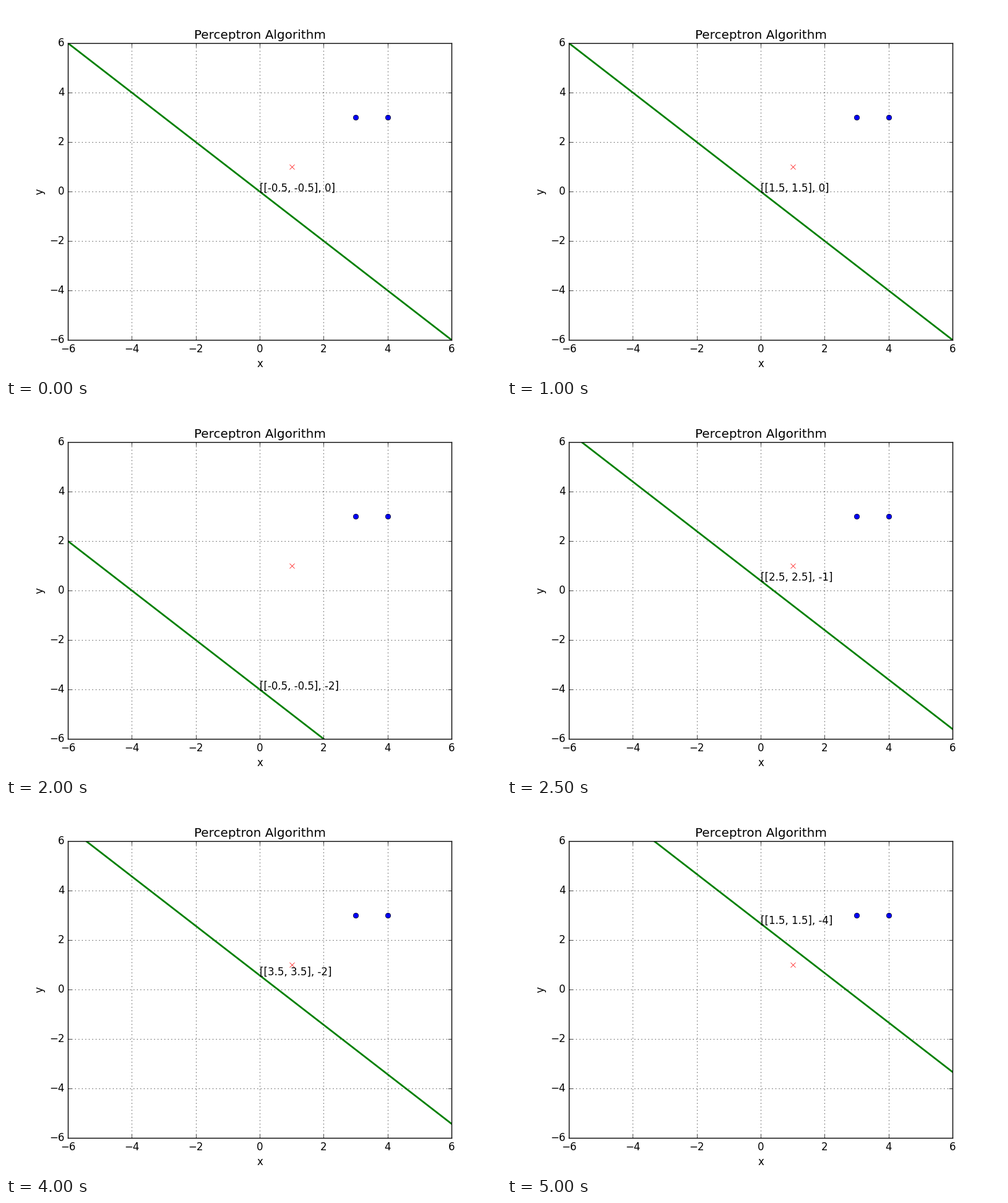
A matplotlib script that plays this animation: 800x600 px, repeating every 5500 ms.

```python
import matplotlib.pyplot as plt
import numpy as np
from matplotlib.animation import FuncAnimation

plt.style.use("classic")
plt.rcParams["font.family"] = "DejaVu Sans"

STEP_MS = 500
LIM = 6
SAMPLES = [((3, 3), 1), ((4, 3), 1), ((1, 1), -1)]


def train(w, b):
    """Return every [weights, bias] state of the perceptron until it converges."""
    history = [[w, b]]
    while True:
        for x, label in SAMPLES:
            if label * (np.dot(w, x) + b) <= 0:
                w = [wi + label * xi for wi, xi in zip(w, x)]
                b += label
                history.append([w, b])
                break
        else:
            return history


history = train([-0.5, -0.5], 0)

fig = plt.figure(figsize=(8, 6), dpi=100, facecolor="white")
ax = fig.add_axes([0.125, 0.1, 0.775, 0.8])
ax.set(xlim=(-LIM, LIM), ylim=(-LIM, LIM), xlabel="x", ylabel="y")
ax.set_xticks(range(-LIM, LIM + 1, 2))
ax.set_yticks(range(-LIM, LIM + 1, 2))
ax.set_title("Perceptron Algorithm", y=1.0)
ax.grid(True)

xs = np.array([-7, 7])
line, = ax.plot([], [], "g", lw=2)
for style, sign in (("bo", 1), ("rx", -1)):
    points = [x for x, label in SAMPLES if label == sign]
    ax.plot(*zip(*points), style)
label = ax.text(0, 0, "")


def update(i):
    w, b = history[i]
    line.set_data(xs, -(b + w[0] * xs) / w[1])
    label.set_position((0, -b / w[1]))
    label.set_text(str([w, b]))
    return line, label


anim = FuncAnimation(fig, update, frames=len(history), interval=STEP_MS,
                     repeat=True, repeat_delay=0)
plt.show()
```
